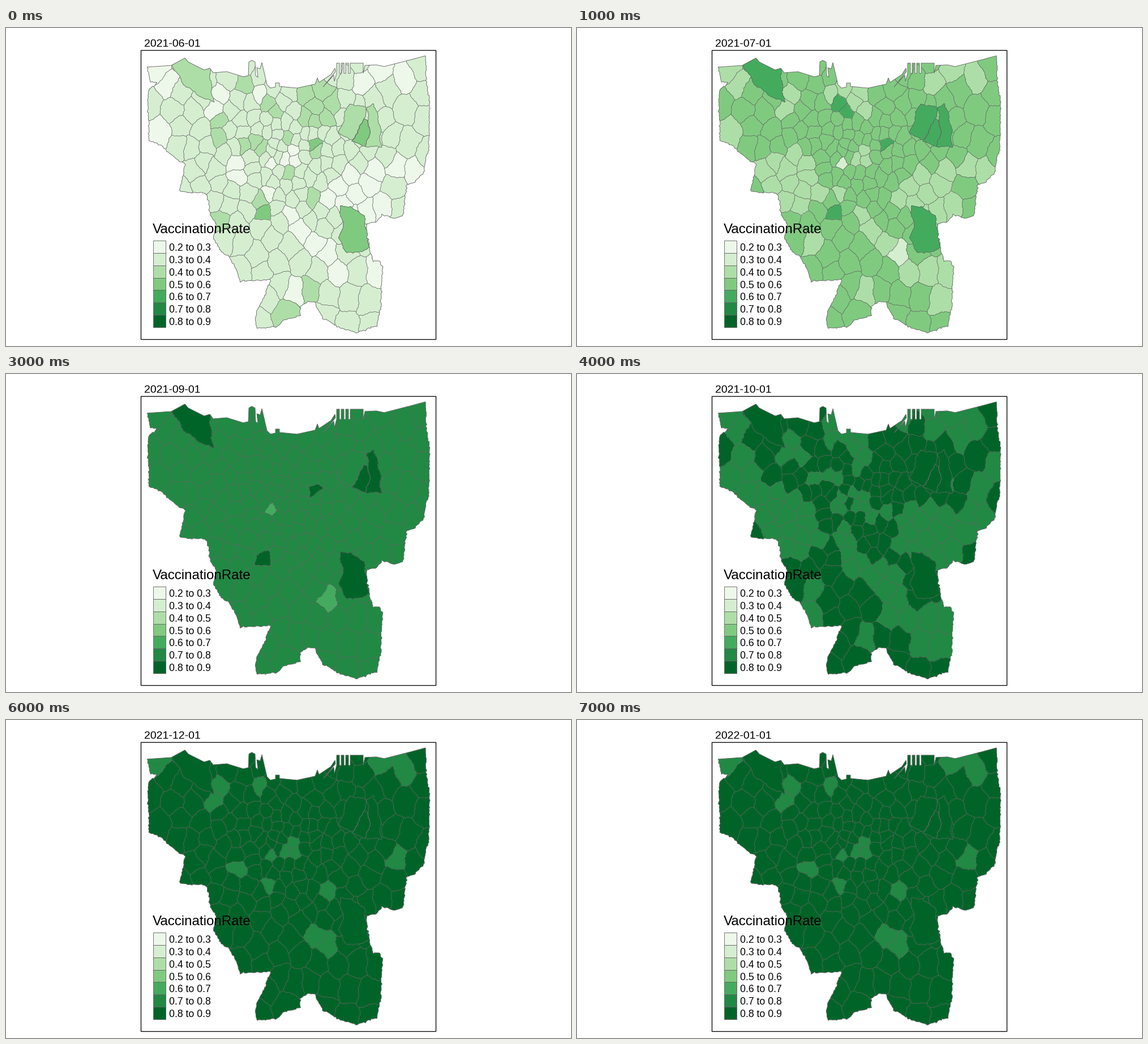
A matplotlib script for the animation above (8 s loop, 998 px wide and 561 px high).

```python
import numpy as np
import matplotlib.pyplot as plt
from matplotlib.animation import FuncAnimation
from matplotlib.collections import LineCollection, PolyCollection
from matplotlib.patches import Polygon, Rectangle

W, H, DPI = 998, 561, 64
PX = 72 / DPI
GREENS = np.array(["#eef8ea", "#d5eed0", "#aedea7", "#80ca80", "#44ab5e", "#218944",
                   "#006428"])
GREY = "#666666"
DATES = [f"2021-{m:02d}-01" for m in range(6, 13)] + ["2022-01-01"]
# Rate of a ward = mean + spread * score, month by month
MEAN = [0.36, 0.525, 0.6455, 0.753, 0.803, 0.82, 0.825, 0.8275]
SPREAD = [0.1, 0.06, 0.04, 0.035, 0.03, 0.03, 0.025, 0.025]
CENTRE = 490, 215
TALL = 0.85
rng = np.random.default_rng(7)

# Shoreline and province border, clockwise
NORTH = [(249, 69), (292, 66), (316, 53), (322, 60), (350, 74), (360, 71), (366, 79),
         (390, 77), (419, 86), (428, 84), (429, 60), (434, 57), (440, 60), (441, 84),
         (445, 87), (443, 70), (449, 72), (452, 61), (461, 100), (467, 106), (476, 104),
         (476, 97), (483, 97), (483, 103), (514, 106), (546, 99), (550, 88), (553, 96),
         (574, 82), (581, 71), (582, 77), (560, 104), (579, 83), (580, 94)]
PIERS = [(x, y) for left, width in ((584, 5), (592, 5), (600, 5), (608, 23))
         for x, y in ((left, 80), (left, 62), (left + width, 62), (left + width, 80))]
NORTH_EAST = [(634, 66), (654, 65), (668, 68), (715, 56), (741, 49)]
EAST = [(741, 49), (744, 105), (748, 130), (747, 215), (741, 230), (740, 252), (722, 272),
        (708, 277), (701, 331), (685, 335), (665, 330), (655, 342), (636, 346), (642, 388),
        (648, 412), (660, 410), (665, 420), (662, 490), (655, 525), (620, 538)]
SOUTH = [(620, 538), (585, 527), (560, 512), (545, 484), (535, 482), (520, 492), (520, 508),
         (490, 516), (480, 527), (443, 530), (441, 518), (443, 500), (458, 470), (467, 444)]
WEST = [(467, 444), (413, 447), (407, 425), (392, 402), (380, 395), (366, 370), (372, 345),
        (360, 330), (359, 305), (352, 292), (306, 288), (317, 240), (304, 234), (275, 208),
        (253, 199), (252, 170), (250, 135), (252, 110), (267, 95), (255, 95), (249, 69)]

# Districts that stand out, by score: centre and radius
SPOTS = {
    -0.5: [(640, 480, 34), (378, 275, 58), (500, 112, 40), (415, 378, 18), (620, 430, 24)],
    -0.65: [(285, 97, 22), (275, 185, 22), (405, 240, 15), (720, 250, 20), (655, 430, 14),
            (512, 462, 10)],
    -0.95: [(620, 293, 48), (628, 95, 24), (650, 248, 26), (520, 355, 20), (588, 432, 14),
            (502, 327, 10)],
    -1.11: [(270, 76, 20), (370, 142, 28), (510, 233, 18), (705, 90, 22)],
    -1.25: [(408, 262, 10), (690, 245, 15), (568, 302, 12), (550, 380, 20), (465, 291, 10)],
    -1.5: [(448, 118, 18), (660, 72, 18)],
    -2.2: [(470, 238, 12), (567, 396, 12)],
    0.6: [(423, 100, 22), (380, 163, 18), (378, 192, 14), (440, 200, 22), (545, 138, 32),
          (497, 195, 13), (548, 214, 10), (540, 302, 14), (450, 305, 18), (495, 505, 22),
          (536, 460, 12), (380, 340, 10), (500, 256, 12)],
    1.3: [(463, 133, 8), (477, 147, 8)],
    1.5: [(455, 325, 9), (545, 207, 5)],
}
# Large wards with their own outline, by score
BIG = [
    (1.38, [(293, 64), (310, 50), (350, 70), (360, 70), (362, 100), (366, 132), (318, 105)]),
    (1.3, [(606, 133), (638, 141), (632, 161), (612, 199), (588, 184)]),
    (1.6, [(632, 161), (641, 165), (642, 190), (635, 208), (612, 201)]),
    (1.38, [(650, 132), (661, 172), (662, 211), (635, 208), (642, 190), (638, 141)]),
    (1.6, [(589, 315), (607, 314), (632, 332), (642, 388), (612, 398), (602, 395),
           (587, 370), (596, 355)]),
]


def dense(pts, step=3):
    """Add points along every edge."""
    pts = np.array(pts, float)
    out = []
    for a, b in zip(pts[:-1], pts[1:]):
        n = max(1, int(np.hypot(*(b - a)) / step))
        out.append(a + (b - a) * np.arange(n)[:, None] / n)
    return np.vstack(out + [pts[-1:]])


def rough(pts):
    p = dense(pts)
    p[1:-1] += rng.normal(0, 0.8, p[1:-1].shape)
    return p


def wavy(pts):
    """Bend a ring by a field of place, so that neighbours still meet."""
    p = dense(np.vstack([pts, pts[:1]]))
    x, y = p.T
    dx = 0.6 * np.sin(0.8 * y + 0.3 * x) + 1.5 * np.sin(0.21 * y + 0.05 * x)
    dy = 0.6 * np.sin(0.7 * x - 0.3 * y) + 1.5 * np.sin(0.19 * x - 0.06 * y)
    return np.column_stack([x + dx, y + dy])


def scatter(seeds, land, tries=12000):
    """Add seeds at random, closer together near the centre."""
    seeds = list(seeds)
    path = land.get_path()
    for p in rng.uniform((245, 50), (750, 540), (tries, 2)):
        gap = 11 + 0.075 * np.hypot(*(p - CENTRE))
        d = np.array(seeds) - p
        if np.hypot(d[:, 0], d[:, 1] * TALL).min() > gap and path.contains_point(p):
            seeds.append(p)
    return np.array(seeds, float)


def cut(poly, mid, normal):
    """Keep the part of a polygon behind a line."""
    side = (poly - mid) @ normal
    if (side <= 0).all():
        return poly
    out = []
    for i in range(len(poly)):
        a, b, s, t = poly[i - 1], poly[i], side[i - 1], side[i]
        if s * t < 0:
            out.append(a + (b - a) * s / (s - t))
        if t <= 0:
            out.append(b)
    return np.array(out)


def cell(i, seeds):
    """The ward nearest to one seed, in a metric that favours tall wards."""
    delta = (seeds - seeds[i]) * (1, TALL)
    poly = np.array([(240, 45), (755, 45), (755, 545), (240, 545)], float)
    for j in np.argsort(np.hypot(*delta.T))[1:36]:
        poly = cut(poly, (seeds[i] + seeds[j]) / 2, delta[j] * (1, TALL))
    return wavy(poly)


fig = plt.figure(figsize=(W / DPI, H / DPI), dpi=DPI, facecolor="white")
plt.rcParams["font.family"] = "Liberation Sans"
ax = fig.add_axes([0, 0, 1, 1])
ax.set(xlim=(0, W), ylim=(H, 0))
ax.axis("off")

border = np.vstack([NORTH, PIERS, NORTH_EAST, rough(EAST), rough(SOUTH), rough(WEST)])
land = Polygon(border, fill=False, ec=GREY, lw=0.9 * PX, zorder=4)
ax.add_patch(land)

spots = [(x, y, r, s) for s, group in SPOTS.items() for x, y, r in group]
seeds = scatter([spot[:2] for spot in spots], land)
scores = rng.uniform(-0.38, 0.38, len(seeds))
for x, y, r, s in spots:
    scores[np.hypot(seeds[:, 0] - x, seeds[:, 1] - y) < r] = s


def mesh(rings, values, lw, z):
    """Fill wards crisply and draw thin limits over them."""
    fill = PolyCollection(rings, edgecolors="none", antialiaseds=False, zorder=z)
    limits = LineCollection(rings, colors=GREY, linewidths=lw * PX, zorder=z + 0.5)
    for part in (fill, limits):
        ax.add_collection(part, autolim=False)
        part.set_clip_path(land)
    return fill, np.array(values)


layers = [mesh([cell(i, seeds) for i in range(len(seeds))], scores, 0.5, 1),
          mesh([wavy(pts) for _, pts in BIG], [s for s, _ in BIG], 0.8, 2)]

# Frame and legend
ax.add_patch(Rectangle((238.5, 38.5), 521, 510, fill=False, ec="k", lw=1.3 * PX))


def text(x, y, s, size):
    return ax.text(x, y, s, fontsize=size * PX, va="baseline", color="k", zorder=6)


title = text(244, 33, DATES[0], 19.4)
text(258.5, 361.5, "VaccinationRate", 24.1)
step = 153 / 7
for i, color in enumerate(GREENS):
    y = 375 + i * step
    ax.add_patch(Rectangle((260.5, y), 22, step, fc=color, ec=GREY, lw=0.9 * PX, zorder=5))
    text(288, y + 18, f"0.{i + 2} to 0.{i + 3}", 17.6)


def draw(month):
    title.set_text(DATES[month])
    for fill, score in layers:
        rate = MEAN[month] + SPREAD[month] * score
        level = np.clip(np.floor(rate * 10 - 2), 0, 6).astype(int)
        fill.set_facecolor(GREENS[level])
    return [title]


anim = FuncAnimation(fig, draw, frames=len(DATES), interval=1000, repeat=True)
plt.show()
```
